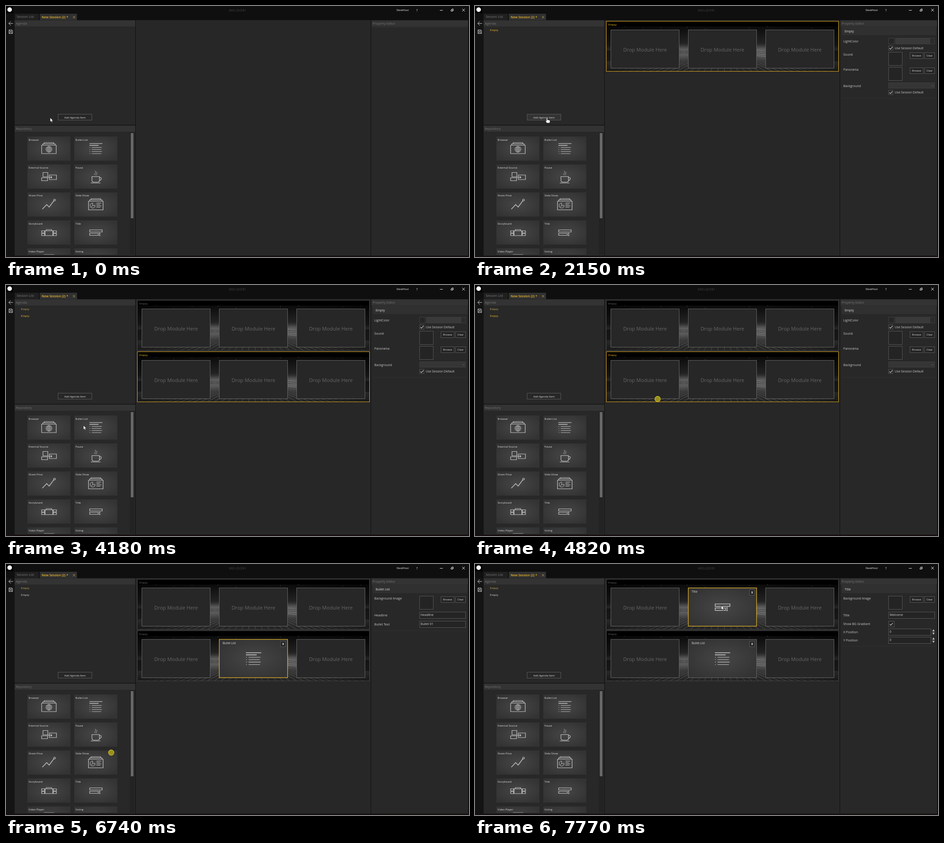
Recreate the animation shown at these times as an HTML page. Size 1017 px wide and 551 px high, loop 8 s.

```html
<!DOCTYPE html>
<html lang="en">
<head>
<meta charset="utf-8">
<title>Session editor</title>
<style>
html, body { margin: 0; width: 100%; height: 100%; overflow: hidden; background: #0f0f0f; }
svg { display: block; width: 1017px; height: 551px; font-family: "Open Sans", "Noto Sans", sans-serif; }
text { white-space: pre; }
.hide { display: none; }
.line { fill: none; stroke: #c6c6c6; stroke-width: 1.2; }
.slot { fill: #272727; stroke: #646464; }
.row rect.frame { fill: none; stroke: #464646; }
.row .name { fill: #6c6c6c; }
.row.sel rect.frame { stroke: #dba520; }
.row.sel .name { fill: #fcc22c; }
.module .edge { stroke: #646464; }
.module.sel .edge { stroke: #dfb02a; stroke-width: 1.3; }
</style>
</head>
<body>
<svg id="stage" viewBox="0 0 1017 551"></svg>
<script>
const LOOP = 8000;
const SLOT_X = [298.5, 468.5, 638.5], SLOT_W = 150, SLOT_H = 84;
const ROW_Y = [34, 147], SLOT_DY = 18.5;

const rect = (x, y, w, h, fill, stroke = 'none', more = '') =>
  `<rect x="${x}" y="${y}" width="${w}" height="${h}" fill="${fill}" stroke="${stroke}" ${more}/>`;
const text = (x, y, s, size = 7, fill = '#cacaca', more = '') =>
  `<text x="${x}" y="${y}" font-size="${size}" fill="${fill}" ${more}>${s}</text>`;
const path = (d, more = 'class="line"') => `<path d="${d}" ${more}/>`;
const group = (id, body, more = '') => `<g id="${id}" ${more}>${body}</g>`;

// Icons, each drawn around its own centre
const icons = {
  browser: path('M-16 -7.5H16V11H-16ZM-13.5 -8V-10.5H13.5V-8M-10.5 -11V-13H10.5V-11') +
    `<g class="line" style="stroke-width:.8"><circle cy="1.5" r="6.5"/><ellipse cy="1.5" rx="3" ry="6.5"/>` +
    `<path d="M0 -5V8M-6.5 1.5H6.5M-5.5 -1.8H5.5M-5.5 4.8H5.5"/></g>`,
  bullets: path('M-14 -11H14.5') + path('M-14 -7H6', 'class="line" style="stroke-width:1.5"') +
    [-2.5, 2, 6.5, 11].map((y, i) =>
      path(`M-13.7 ${y}h1.5M-9 ${y}H${[13, 12, 13.5, 12][i]}`, 'class="line" style="stroke-width:.9"')).join(''),
  external: path('M-13 -9H-2.5V.5H-13ZM-16 2.5H-3V9H-16ZM1 -3.5H16.5V6.5H1ZM-2.5 1.5H6M4 -.7L6.5 1.5L4 3.7'),
  pause: path('M-8.5 0H8V8Q8 12 4 12H-4.5Q-8.5 12 -8.5 8ZM8 2H10Q12 2 12 4.5T8 9M-11 14H10') +
    path('M-1 -3Q-4 -5 -1 -8T-2 -12M2 -3Q0 -5 2 -7T2 -10', 'class="line" style="stroke-width:.8"'),
  share: path('M-14.5 10L-5 0L.5 5.5L10.8 -8.5', 'class="line" style="stroke-width:1.4"') +
    '<circle class="line" cx="12.3" cy="-10" r="2"/>',
  slides: path('M-16 -7.5H16V11.5H-16ZM-13.5 -8V-10.5H13.5V-8M-10.5 -11V-13H10.5V-11') +
    path('M-7 -3.5A5.5 5.5 0 1 0 -1.5 2H-7ZM-7 2L-11 6M1.5 -3.5H12M1.5 -.5H9M1.5 2.5H12M1.5 5.5H10', 'class="line" style="stroke-width:.9"'),
  story: path('M-8.5 -4H8.5V6.5H-8.5ZM-6 -4V-6.5H6V-4M-16 -4H-9.5V.5H-16ZM-16 2H-9.5V6.5H-16ZM9.5 -4H16.5V.5H9.5ZM9.5 2H16.5V6.5H9.5Z'),
  title: path('M-13.5 -6H14V-1.5H-13.5ZM-13.5 1.5H5.5V6H-13.5ZM8.5 1V6.5M7 1H10M7 6.5H10')
};
const icon = (name, x, y, k = 1) => `<g transform="translate(${x} ${y}) scale(${k})">${icons[name]}</g>`;

const tiles = [
  ['Browser', 'browser', 313], ['Bullet List', 'bullets', 313],
  ['External Source', 'external', 374.5], ['Pause', 'pause', 374.5],
  ['Share Price', 'share', 436], ['Slide Show', 'slides', 436],
  ['Storyboard', 'story', 497.5], ['Title', 'title', 497.5],
  ['Video Player'], ['Voting']
];
const tile = ([name, art, cy], i) => {
  const x = 47 + i % 2 * 103, y = 286.5 + (i >> 1) * 61.4;
  return rect(x, y, 94.5, 53, 'url(#tile)') + text(x + 2.6, y + 9, name, 5.95, '#dedede') +
    (art ? icon(art, x + 47.3, cy) : '');
};

function defs() {
  let floor = '', stars = '';
  for (let x = -160; x <= 670; x += 15) floor += `M${255 + (x - 255) * .28} 72L${x} 110`;
  for (let i = 0; i < 9; i++) stars += `M${(i * 137 + 40) % 508} ${12.5 + i * 7 % 6}h1.3`;
  const stands = [64, 68, 72, 76].map(y => `M331 ${y}l19 2`).join('');
  const glow = x => `<ellipse cx="${x}" cy="68" rx="46" ry="20" fill="url(#glow)"/>`;
  return `<defs>
    <radialGradient id="tile" r=".6"><stop stop-color="#464646"/><stop offset="1" stop-color="#333"/></radialGradient>
    <radialGradient id="glow"><stop stop-color="#888" stop-opacity=".5"/><stop offset="1" stop-color="#888" stop-opacity="0"/></radialGradient>
    <linearGradient id="sky" x2="0" y2="1"><stop stop-color="#0b0b0b"/><stop offset=".42" stop-color="#262626"/>
      <stop offset=".52" stop-color="#484848"/><stop offset=".55" stop-color="#262626"/>
      <stop offset=".85" stop-color="#303030"/><stop offset="1" stop-color="#222"/></linearGradient>
    <linearGradient id="sides"><stop stop-opacity=".5"/><stop offset=".3" stop-opacity="0"/>
      <stop offset=".7" stop-opacity="0"/><stop offset="1" stop-opacity=".5"/></linearGradient>
    <clipPath id="list"><rect x="19" y="277" width="253" height="269"/></clipPath>
    <clipPath id="view"><rect width="511" height="111"/></clipPath>
    <g id="scene" clip-path="url(#view)">
      ${rect(0, 0, 511, 111, '#000')}${rect(0, 12, 511, 98, 'url(#sky)')}${glow(171)}${glow(340)}
      ${path(floor, 'stroke="#6a6a6a" stroke-width=".9" opacity=".7"')}
      ${path(stars, 'stroke="#666" stroke-width=".9"')}
      ${path(stands, 'stroke="#7c7c7c" stroke-width="1.3" stroke-dasharray="3 1"')}
      ${rect(0, 12, 511, 98, 'url(#sides)')}
    </g></defs>`;
}

function chrome() {
  const head = (x, y, w, s) => rect(x, y, w, 13, '#333') + text(x + 2.5, y + 9.3, s, 7, '#737373');
  return rect(0, 0, 1017, 551, '#0f0f0f') + rect(0, 31, 19, 517, '#141414') +
    rect(0, 1, 16, 15, '#000') + '<circle cx="8" cy="8" r="5" fill="#fff"/>' +
    text(508.5, 12, 'MELQORI', 7.4, '#383838', 'text-anchor="middle" font-weight="600" letter-spacing=".6"') +
    text(858, 11.3, 'DeskHost', 5.95, '#fff') + text(901.3, 11.6, '?', 7, '#fff') +
    path('M953 9.5H959.5M979.5 8.5V6.5H982.5V10.5H980.5M977.5 8.5H980.5V11.5H977.5ZM1002 6L1008 12M1008 6L1002 12', 'fill="none" stroke="#ddd"') +
    rect(19, 17, 53, 14, '#202020') + text(23.5, 26, 'Session List', 7.05, '#777') +
    rect(74, 17, 82, 14, '#303030') + text(78.3, 27, 'New Session (2) *', 7, '#edb92e', 'font-weight="600"') +
    path('M147 22L152 27M152 22L147 27', 'stroke="#c9a94e" stroke-width=".9"') +
    path('M15.5 38.3H6M10.5 33.8L6 38.3L10.5 42.8', 'fill="none" stroke="#ccc"') +
    path('M6.5 52.5H13L14.5 54V60.5H6.5ZM8.3 52.5V55.5H12.5V52.5M8.3 60.5V57.5H12.7V60.5', 'fill="none" stroke="#bbb"') +
    rect(19, 31, 265, 230, '#282828') + head(19, 32, 265, 'Agenda') +
    rect(19, 262, 265, 286, '#282828') + head(19, 263, 265, 'Repository') +
    rect(285, 31, 516, 517, '#272727') +
    rect(802, 31, 213, 517, '#282828') + head(803, 32, 212, 'Property Editor') +
    rect(804, 46, 210, 1, '#323232') +
    rect(272, 277, 10, 269, '#232323') + rect(274, 279, 6, 187, '#676767') +
    `<g clip-path="url(#list)">${tiles.map(tile).join('')}${path('M83 546H106')}</g>` +
    rect(0, 548, 1017, 3, '#170f11') +
    rect(114.5, 237.5, 74, 13, '#272727', '#585858', 'id="add"') +
    text(151.5, 246.6, 'Add Agenda Item', 5.85, '#e0e0e0', 'text-anchor="middle"');
}

function row(i) {
  const y = ROW_Y[i], name = '<text class="name" x="293" y="' + (y + 8.6) + '" font-size="6.1">Empty</text>';
  const slots = SLOT_X.map(x => `<rect class="slot" x="${x}" y="${y + SLOT_DY}" width="${SLOT_W}" height="${SLOT_H}"/>` +
    text(x + SLOT_W / 2, y + 65.6, 'Drop Module Here', 11.1, '#666', 'text-anchor="middle"')).join('');
  return group('row' + i, `<use href="#scene" x="288" y="${y - 1}"/>` + name + slots +
    `<rect class="frame" x="288.5" y="${y - .5}" width="510" height="110"/>`, 'class="row"');
}

function module(id, i, name, art) {
  const y = ROW_Y[i] + SLOT_DY, x = SLOT_X[1];
  return group(id, `<rect class="edge" x="${x}" y="${y}" width="${SLOT_W}" height="${SLOT_H}" fill="url(#tile)"/>` +
    text(476, y + 10.7, name, 6.3, '#dedede') + rect(603, y + 4, 11, 12, '#222', '#686868', 'stroke-width=".8"') +
    text(608.6, y + 12.5, 'X', 6.6, '#eee', 'text-anchor="middle" font-weight="700"') +
    icon(art, 543.5, y + 42.2, 1.18), 'class="module"');
}

const label = (y, s) => text(809, y, s, 6.95);
const box = (x, y, w, h) => rect(x + .5, y + .5, w, h, '#242424', '#555');
const button = (x, y, w, s) => box(x, y, w, 13) +
  text(x + w / 2 + .5, y + 9.3, s, 5.75, '#dedede', 'text-anchor="middle"');
const media = y => box(908, y, 30, 29) + button(955, y + 1, 29, 'Browse') + button(987, y + 1, 22, 'Clear');
const check = (x, y, k = 1) => box(x, y, 9.5 * k, 9.5 * k) +
  path(`M${x + 2.3 * k} ${y + 5.5 * k}l2.3 2.3l4.3 -5`, 'fill="none" stroke="#ddd" stroke-width="1.1"');
const input = (y, s, w = 102) => box(908, y, w - 1, 14) + text(910.8, y + 9.3, s, 6.8, '#d4d4d4');
const sheet = (id, name, end, body) => group(id,
  rect(806, 47, 207, 17, '#303030') + text(812, 58, name, 6.8, '#e2e2e2') +
  rect(806, end, 207, 1, '#2f2f2f') + body);
const spin = y => input(y, '0', 94) +
  path(`M1004.5 ${y + 6}l2.6 -5l2.6 5zM1004.5 ${y + 8.5}l2.6 5l2.6 -5z`, 'fill="#bbb"');

function sheets() {
  const byDefault = y => check(908, y) + text(922, y + 7.6, 'Use Session Default', 6.85);
  return sheet('propEmpty', 'Empty', 202,
      label(80, 'LightColor') + rect(908.5, 70.5, 12.5, 13, '#262626', '#404040') +
      rect(923.5, 70.5, 86, 13, '#2b2b2b', '#3c3c3c') + rect(924, 71, 76, 12, '#393939') + byDefault(87) +
      label(108.6, 'Sound') + media(101) + label(141.6, 'Panorama') + media(134) +
      label(177.6, 'Background') + rect(908.5, 168.5, 101, 12, '#353535', '#3d3d3d') +
      path('M1003 174l2 2l2 -2', 'fill="none" stroke="#666" stroke-width=".8"') + byDefault(184.5)) +
    sheet('propBullet', 'Bullet List', 146,
      label(78, 'Background Image') + media(70) +
      label(115, 'Headline') + input(105, 'Headline') + label(135, 'Bullet Text') + input(125, 'Bullet 01')) +
    sheet('propTitle', 'Title', 180,
      label(78, 'Background Image') + media(70) + label(115, 'Title') + input(105, 'Welcome') +
      label(134, 'Show BG Gradiant') + check(908, 125, 1.32) +
      label(152, 'X Position') + spin(142) + label(170, 'Y Position') + spin(160));
}

function overlay() {
  const drop = rect(0, -.5, SLOT_W, 3, '#175019') + rect(0, 3, SLOT_W, 79, '#155a17', '#8b8f8b', 'stroke-width="1.7"') +
    text(SLOT_W / 2, 47.1, 'Drop Module Here', 11.1, '#2b6e2d', 'text-anchor="middle"');
  const hand = 'M-1.2 1Q0 -1 1.2 1V5Q2.4 4.2 3.2 5.2Q4.4 4.6 5 5.7Q6.6 5.3 6.8 7V9Q6.6 10.4 5.6 12H-.2L-3.2 8Q-3.4 6.4 -1.2 7.4Z';
  return group('drop', drop) +
    group('arrow', path('M0 0V9.4L2.2 7.5L3.8 11L5.4 10.3L3.9 6.9H6.6Z', 'fill="#fff" stroke="#111" stroke-width=".7"')) +
    group('hand', path(hand, 'fill="#fff" stroke="#111" stroke-width=".8"')) +
    group('disc', '<circle r="5.9" fill="#6f6814" stroke="#e3d22c" stroke-width="1.2"/>' +
      '<circle r="3.7" fill="none" stroke="#d8c82b" stroke-width="1"/><circle r="1.5" fill="none" stroke="#d8c82b" stroke-width=".9"/>');
}

document.getElementById('stage').innerHTML = defs() + chrome() +
  text(33, 55.3, 'Empty', 6.1, '#fcc22c', 'id="item0"') + text(33, 70.2, 'Empty', 6.1, '#fcc22c', 'id="item1"') +
  row(0) + row(1) + module('modBullet', 1, 'Bullet List', 'bullets') + module('modTitle', 0, 'Title', 'title') +
  sheets() + overlay();

const el = {};
document.querySelectorAll('[id]').forEach(e => el[e.id] = e);
const show = (id, on) => el[id].classList.toggle('hide', !on);
const select = (id, on) => el[id].classList.toggle('sel', on);
const place = (id, x, y) => el[id].setAttribute('transform', `translate(${x} ${y})`);

// Pointer moves: first step, last step, steps, then start, bend and end of the curve
const moves = [
  [390, 1080, 10, [97, 245], [128, 251], [158, 245]],
  [2810, 3570, 12, [158, 245], [159, 266], [163, 299]],
  [3640, 4390, 10, [163, 299], [161.6, 304.7], [178.5, 312.5]],
  [4460, 5030, 9, [178.5, 312.5], [330, 268], [528, 217]],
  [5820, 6590, 12, [528, 217], [380, 380], [195.5, 496.5]],
  [6660, 7430, 12, [195.5, 496.5], [289, 240], [541, 91]]
];

function pointer(t) {
  let pos = moves[0][3];
  for (const [from, to, n, a, b, c] of moves) {
    if (t < from) break;
    const step = Math.floor((t - from) / (to - from) * (n - 1) + .01) + 1;
    const p = Math.min(1, step / n), q = 1 - p;
    pos = a.map((v, i) => q * q * v + 2 * p * q * b[i] + p * p * c[i]);
  }
  return pos;
}

function draw(t) {
  const within = (a, b) => t >= a && t < b;
  const [x, y] = pointer(t);
  const onButton = x > 114 && x < 189 && y > 237 && y < 251;

  const press = within(1280, 1410) || within(2020, 2150);
  el.add.setAttribute('fill', press ? '#3c3c3c' : onButton && t >= 1280 ? '#333' : '#272727');
  show('item0', t >= 1540);
  show('item1', t >= 2280);
  el.item0.setAttribute('fill', t < 2280 ? '#fcc22c' : '#cfae54');
  el.item1.setAttribute('fill', t < 5560 ? '#fcc22c' : '#dcdcdc');
  show('row0', t >= 1540);
  show('row1', t >= 2280);
  select('row0', t < 2280);
  select('row1', within(2280, 5560));
  show('modBullet', t >= 5560);
  select('modBullet', t < 7770);
  show('modTitle', t >= 7770);
  select('modTitle', true);
  show('propEmpty', within(1540, 5560));
  show('propBullet', within(5560, 7770));
  show('propTitle', t >= 7770);

  const held = within(4390, 5490) || within(6590, 7700);
  const dragging = within(4390, 5560) || within(6590, 7770);
  const col = SLOT_X.findIndex(s => x > s && x < s + SLOT_W);
  const line = ROW_Y.findIndex(r => y > r + SLOT_DY && y < r + SLOT_DY + SLOT_H);
  const over = dragging && col >= 0 && line >= 0;
  show('drop', over);
  if (over) place('drop', SLOT_X[col], ROW_Y[line] + SLOT_DY);

  const kind = held ? 'disc' : onButton ? 'hand' : 'arrow';
  for (const id of ['arrow', 'hand', 'disc']) show(id, id === kind);
  place(kind, x, y);
}

const start = performance.now();
function tick(now) {
  draw(Math.max(0, now - start) % LOOP);
  requestAnimationFrame(tick);
}
draw(0);
requestAnimationFrame(tick);
</script>
</body>
</html>
```
